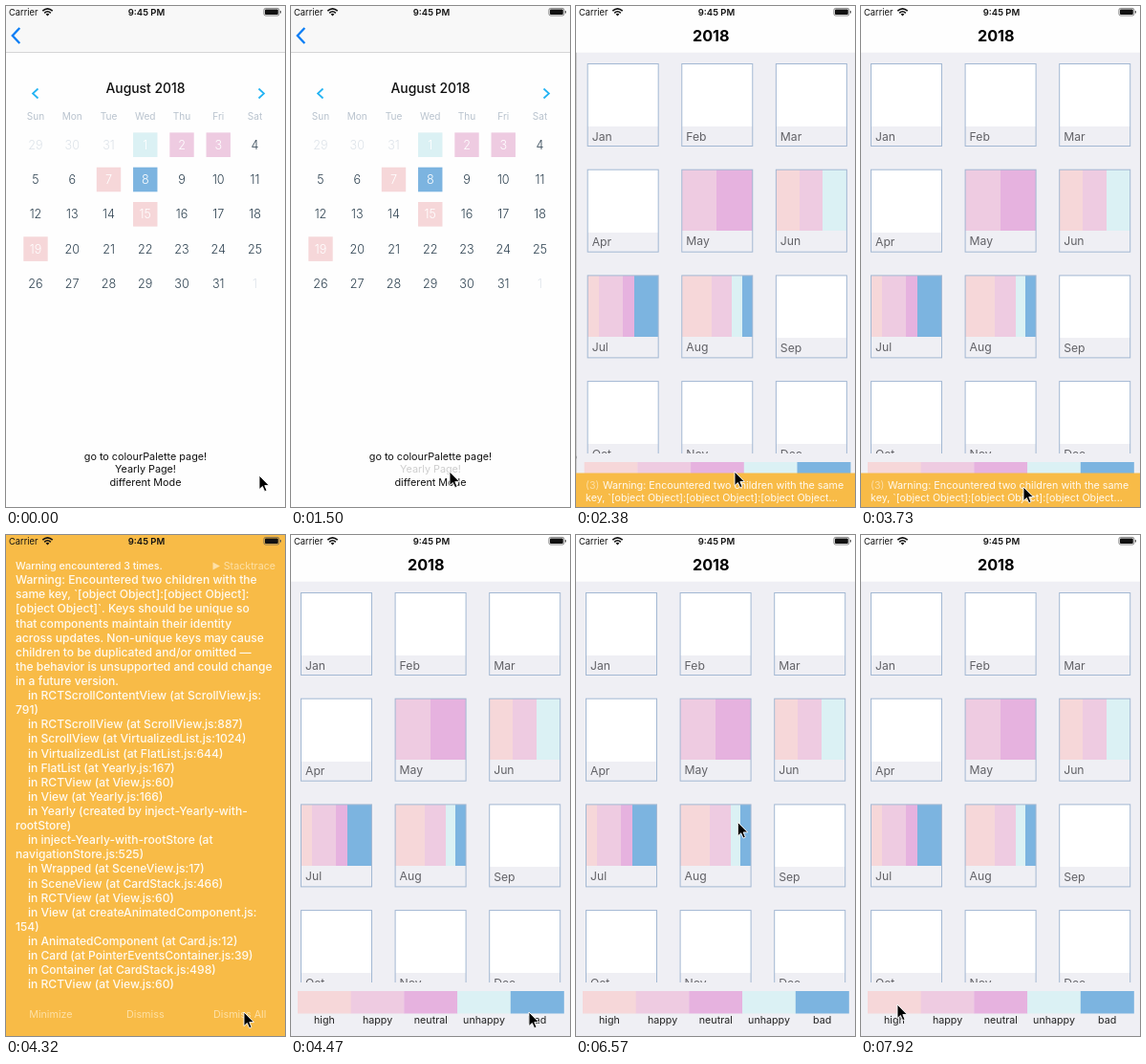
Animation, 292 px wide and 524 px high, one loop 8 s. Source, as an HTML page:

```html
<!DOCTYPE html>
<html lang="en">
<head>
<meta charset="utf-8">
<title>Mood calendar</title>
<style>
html, body { margin: 0; width: 100%; height: 100%; overflow: hidden; background: #fff }
svg { display: block; width: 100vw; height: 100vh }
text { font-family: Inter, Roboto, sans-serif; white-space: pre }
</style>
</head>
<body>
<svg id="stage" viewBox="0 0 292 524"></svg>
<script>
const W = 292, LOOP = 8000, TICK = 149.2;
const mood = { high: '#f6d7d9', happy: '#eecbe1', neutral: '#e6b2df', unhappy: '#dbf1f4', bad: '#7cb4e0' };
const AMBER = '#f8bb47', CREAM = '#fffaf0', GREY = '#efeff4';
const MEDIUM = 'font-weight="500"';

const rect = (x, y, w, h, fill, more = '') =>
  `<rect x="${x}" y="${y}" width="${w}" height="${h}" fill="${fill}" ${more}/>`;
const text = (s, x, y, size, fill = '#111', more = '') =>
  `<text x="${x}" y="${y}" font-size="${size}" fill="${fill}" ${more}>${s}</text>`;
const mid = (s, x, y, size, fill, more = '') => text(s, x, y, size, fill, 'text-anchor="middle" ' + more);
const line = (d, stroke, width, more = '') =>
  `<path d="${d}" fill="none" stroke="${stroke}" stroke-width="${width}" ${more}/>`;
const group = (id, body, more = '') => `<g id="${id}" ${more}>${body}</g>`;

function calendar() {
  const marks = { 1: 'unhappy', 2: 'happy', 3: 'happy', 7: 'high', 8: 'bad', 15: 'high', 19: 'high' };
  let out = rect(0, 0, W, 524, '#fefefe');
  out += mid('August 2018', 146, 91, 13.9, '#111', MEDIUM);
  out += line('M33.5 86.5L28 91.5L33.5 96.5M264.5 86.5L270 91.5L264.5 96.5', '#22b3f3', 1.7);
  'Sun Mon Tue Wed Thu Fri Sat'.split(' ').forEach((d, i) => {
    out += mid(d, 31 + 38.25 * i, 119, 10.1, '#b9c3ce');
  });
  for (let i = 0; i < 35; i++) {
    const day = i - 2, x = 31 + 38.25 * (i % 7), y = 145.2 + 36.3 * Math.floor(i / 7);
    const outside = day < 1 || day > 31, mark = marks[day];
    if (mark) out += rect(x - 12.7, y - 12.8, 25.4, 25.6, mood[mark]);
    const label = day < 1 ? day + 31 : day > 31 ? day - 31 : day;
    out += mid(label, x, y + 4.6, 12.6, mark ? '#fff' : outside ? '#dde3e9' : '#2d4150', 'font-weight="300"');
  }
  out += mid('go to colourPalette page!', 146, 475, 10.8);
  out += mid('Yearly Page!', 146, 488.4, 10.8, '#111', 'id="link"');
  return out + mid('different Mode', 146, 501.8, 10.8);
}

function yearly() {
  const { high, happy, neutral, unhappy, bad } = mood;
  const months = {
    May: [happy, neutral],
    Jun: [high, happy, unhappy],
    Jul: [high, happy, happy, neutral, bad, bad],
    Aug: [high, high, high, happy, happy, unhappy, bad]
  };
  let cards = '';
  'Jan Feb Mar Apr May Jun Jul Aug Sep Oct Nov Dec'.split(' ').forEach((name, i) => {
    const x = 10.5 + 98.6 * (i % 3), y = 60.5 + 110.7 * Math.floor(i / 3);
    const bands = months[name] || ['#fff'], w = 74 / bands.length, h = months[name] ? 64 : 65.5;
    // Each band runs to the right edge, so no seams show between equal neighbours
    bands.forEach((c, k) => {
      const start = k && k * w - .4;
      cards += rect(x + start, y, 74 - start, h, c, 'shape-rendering="crispEdges"');
    });
    cards += rect(x, y, 74, 86, 'none', 'stroke="#a3b8d3"');
    cards += text(name, x + 4.5, y + h + 14.6, 12.2, '#626267');
  });
  let out = rect(-6, 48, 6, 476, 'url(#shade)') + rect(-1, 48, W + 2, 476, GREY);
  out += `<g clip-path="url(#list)">${cards}</g>`;
  Object.keys(mood).forEach((name, i) => {
    const x = 7 + 55.7 * i;
    out += rect(x, 477, 56, 23.5, mood[name]) + mid(name, x + 27.9, 511, 10.7, '#222');
  });
  return out;
}

function banner() {
  return rect(0, 488.5, W, 36, AMBER) +
    text('(3)', 10, 505, 10.7, CREAM, 'opacity=".55"') +
    text('Warning: Encountered two children with the same', 28, 505, 10.75, CREAM) +
    text('key, `[object Object]:[object Object]:[object Object...', 10, 518.2, 10.7, CREAM);
}

function warning() {
  const lines = `Warning: Encountered two children with the
same key, \`[object Object]:[object Object]:
[object Object]\`. Keys should be unique so
that components maintain their identity
across updates. Non-unique keys may cause
children to be duplicated and/or omitted —
the behavior is unsupported and could change
in a future version.
    in RCTScrollContentView (at ScrollView.js:
791)
    in RCTScrollView (at ScrollView.js:887)
    in ScrollView (at VirtualizedList.js:1024)
    in VirtualizedList (at FlatList.js:644)
    in FlatList (at Yearly.js:167)
    in RCTView (at View.js:60)
    in View (at Yearly.js:166)
    in Yearly (created by inject-Yearly-with-
rootStore)
    in inject-Yearly-with-rootStore (at
navigationStore.js:525)
    in Wrapped (at SceneView.js:17)
    in SceneView (at CardStack.js:466)
    in RCTView (at View.js:60)
    in View (at createAnimatedComponent.js:
154)
    in AnimatedComponent (at Card.js:12)
    in Card (at PointerEventsContainer.js:39)
    in Container (at CardStack.js:498)
    in RCTView (at View.js:60)`.split('\n');
  const pale = '#fde0a6';
  let out = rect(0, 0, W, 524, AMBER) + text('Warning encountered 3 times.', 10, 36, 10.7, CREAM, MEDIUM);
  out += `<path d="M216.5 28.5V36.5L224 32.5Z" fill="${pale}"/>`;
  out += text('Stacktrace', 282, 36, 10.7, pale, 'text-anchor="end"');
  lines.forEach((s, i) => out += text(s, 10, 51.2 + 15.11 * i, 12.1, CREAM, MEDIUM));
  ['Minimize', 'Dismiss', 'Dismiss All'].forEach((s, i) => out += mid(s, 46.9 + 98.9 * i, 505, 10.8, pale));
  return out;
}

function statusBar() {
  return text('Carrier', 3, 9.5, 9.3) + mid('9:45 PM', 147, 9.6, 9.5, '#111', 'font-weight="600"') +
    line('M38.3 5.2Q43.5 .4 48.7 5.2M40.2 7.3Q43.5 4.2 46.8 7.3', '#111', 1.6) +
    '<path d="M41.6 8.4Q43.5 6.9 45.4 8.4L43.5 10.4Z" fill="#111"/>' +
    rect(269.9, 2.4, 16, 7.6, 'none', 'rx="1.8" stroke="#555" stroke-width=".7"') +
    rect(271, 3.5, 13.8, 5.4, '#111', 'rx=".9"') + rect(286.8, 4.9, 1.2, 2.6, '#555', 'rx=".6"');
}

const stage = document.getElementById('stage');
stage.innerHTML =
  `<defs><clipPath id="list">${rect(0, 48, W, 420, '#000')}</clipPath>
  <linearGradient id="shade"><stop stop-opacity="0"/><stop offset="1" stop-opacity=".12"/></linearGradient></defs>` +
  group('first', calendar()) + rect(0, 0, W, 524, '#000', 'id="dim"') + group('second', yearly()) +
  rect(0, 0, W, 48, '#f8f8f8') + rect(0, 48, W, .7, '#c4c4c6', 'id="rule"') +
  line('M14.3 23L6.8 31L14.3 39', '#0a7df5', 2.3) +
  group('header', rect(0, 0, W, 48.7, '#fefefe') + mid('2018', 141.3, 36.6, 16.2, '#000', 'font-weight="700"')) +
  group('banner', banner()) + group('warning', warning()) + statusBar() +
  group('cursor', '<path d="M0 0V14.6L3.4 11.5L5.7 16.7L8 15.7L5.8 10.6H10.4Z" stroke="#fff" stroke-width=".9"/>');

const el = {};
for (const id of ['first', 'dim', 'second', 'rule', 'link', 'header', 'banner', 'warning', 'cursor'])
  el[id] = document.getElementById(id);
const show = (node, on) => node.setAttribute('visibility', on ? 'visible' : 'hidden');
const fade = (node, value) => node.setAttribute('opacity', value);
const move = (node, x, y = 0) => node.setAttribute('transform', `translate(${x} ${y})`);

// Pointer stops: tick, x, y
const stops = [
  [0, 265, 491], [3, 265, 491], [6, 204, 482], [8, 166, 487], [23, 166, 487], [25, 170, 503],
  [26, 170, 503], [29, 249, 499], [32, 249, 499], [33, 185, 335], [34, 112, 214], [37, 112, 214],
  [41, 272, 217], [42, 272, 217], [45, 118, 342], [46, 52, 335], [50, 52, 335], [53, 38, 491], [54, 38, 491]
];

function pointer(t) {
  const i = Math.max(1, stops.findIndex(s => s[0] >= t));
  const [t0, x0, y0] = stops[i - 1], [t1, x1, y1] = stops[i], k = (t - t0) / (t1 - t0);
  return [x0 + (x1 - x0) * k, y0 + (y1 - y0) * k];
}

function draw(ms) {
  const t = Math.floor((ms + 8) / TICK);
  const left = t >= 17 ? 0 : Math.exp(-1.29 * Math.max(0, t - 12)), done = 1 - left;
  move(el.first, -89 * done);
  fade(el.dim, .16 * done);
  move(el.second, W * left);
  show(el.second, t > 12);
  fade(el.header, Math.min(1, done * 1.1));
  fade(el.rule, left);
  fade(el.link, t >= 10 && t < 13 ? .2 : 1);
  show(el.banner, t >= 13 && t < 26);
  show(el.warning, t >= 26 && t < 30);
  move(el.cursor, ...pointer(t));
}

function frame() {
  draw(performance.now() % LOOP);
  requestAnimationFrame(frame);
}
frame();
</script>
</body>
</html>
```
